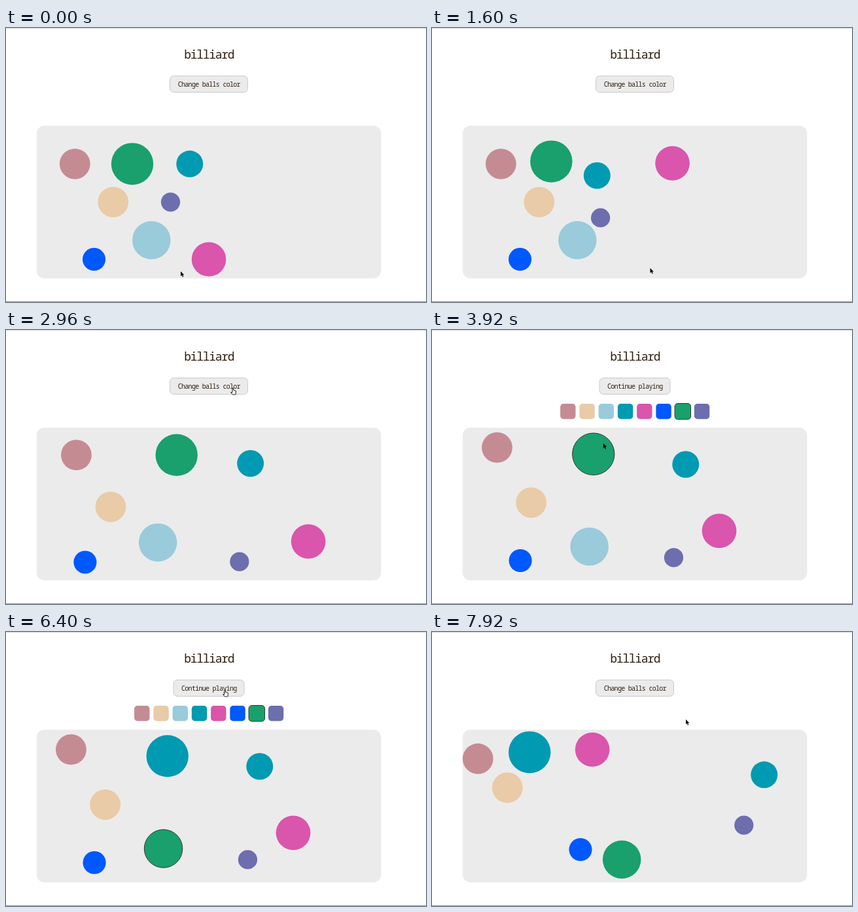
An HTML page with a canvas that plays this animation: 642x420 px, repeating every 8 s.

```html
<!DOCTYPE html>
<html lang="en">
<head>
<meta charset="utf-8">
<title>billiard</title>
<style>
html, body { margin: 0; width: 100%; height: 100%; overflow: hidden; background: #fff; }
canvas { display: block; }
</style>
</head>
<body>
<canvas id="stage" width="642" height="420"></canvas>
<script>
const ctx = document.getElementById('stage').getContext('2d');
const LOOP = 8000, STEP = 80;
const PAUSE = 3120, RESUME = 6560;
const TABLE = { x: 46.8, y: 149.8, w: 900, h: 400, scale: 0.585 };
const BOUNCE = 0.7;   // share of speed kept after a cushion
const TRAVEL = 500;   // pointer move time
const TEAL = '#009ab2', GREEN = '#19a06c', INK = '#2e1f0f', GREY = '#ebebeb', RING = '#333';

// Balls live in table units. Each hit is [time, x, y, cushions touched on the way].
const ball = (color, r, ...hits) => ({ color, r, hits });

const rose = ball('#c58b93', 40, [1690, 100, 100], [2440, 148, 135], [3120, 90, 52],
  [3960, 43, 82, 'top'], [4480, 40, 76]);
const tan = ball('#e9cba7', 40, [2440, 200, 200], [2675, 219, 227], [3960, 104, 138], [4480, 117, 152]);
const sky = ball('#99cbdb', 50, [1615, 300, 300], [1763, 229, 340], [2160, 311, 322],
  [2675, 291, 281], [3680, 382, 350], [4480, 416, 340]);
const teal = ball(TEAL, 35, [1385, 400, 100], [1530, 335, 135], [2160, 481, 94],
  [2617, 507, 88], [4480, 788, 118]);
const pink = ball('#da55ac', 45, [500, 450, 350], [1385, 467, 42, 'right'],
  [2960, 710, 298, 'right bottom'], [4480, 339, 52, 'top']);
const blue = ball('#0058ff', 30, [1763, 150, 350], [4233, 319, 319, 'left bottom'], [4480, 308, 314]);
const green = ball(GREEN, 55, [1555, 250, 100], [1690, 195, 81], [2617, 417, 77, 'top'],
  [3680, 258, 60], [4480, 175, 59, 'top']);
const purple = ball('#6c6eae', 25, [1530, 350, 200], [1618, 363, 252], [2160, 434, 299],
  [2960, 530, 351, 'bottom'], [4480, 735, 250]);
const balls = [rose, tan, sky, teal, pink, blue, green, purple];

const stops = [[700, 333.5, 368], [2850, 347, 89], [3600, 247, 195], [4240, 297, 123],
  [4920, 253, 336], [5760, 384, 123], [6400, 335, 89], [7040, 422, 92], [7880, 388, 134]];

const mix = (a, b, k) => a + (b - a) * k;
const clamp = k => Math.min(1, Math.max(0, k));
const smooth = k => k * k * (3 - 2 * k);

function cushion(name, r) {
  const axis = name === 'left' || name === 'right' ? 0 : 1;
  const far = name === 'right' || name === 'bottom';
  return { axis, far, at: far ? (axis ? TABLE.h : TABLE.w) - r : r };
}

// Straight run towards the mirrored end point, folded back at the cushions.
function roll(from, to, names, r, k) {
  const walls = names ? names.split(' ').map(name => cushion(name, r)) : [];
  const end = [...to];
  for (const { axis, at } of walls) end[axis] = 2 * at - end[axis];
  if (walls.length) {
    const { axis, at } = walls[0];
    const share = (at - from[axis]) / (end[axis] - from[axis]);
    const hit = share / (share + (1 - share) / BOUNCE);
    k = k < hit ? k / hit * share : mix(share, 1, (k - hit) / (1 - hit));
  }
  const p = from.map((v, i) => mix(v, end[i], k));
  for (const { axis, far, at } of walls) {
    p[axis] = (far ? Math.min : Math.max)(p[axis], 2 * at - p[axis]);
  }
  return p;
}

function place({ hits, r }, t) {
  const next = hits.findIndex(hit => hit[0] > t);
  if (next <= 0) return hits.at(next).slice(1, 3);
  const [t0, ...from] = hits[next - 1], [t1, x, y, names] = hits[next];
  return roll(from.slice(0, 2), [x, y], names, r, (t - t0) / (t1 - t0));
}

function pointerAt(t) {
  return stops.reduce(([px, py], [arrive, x, y]) => {
    const k = smooth(clamp((t - arrive) / TRAVEL + 1));
    return [mix(px, x, k), mix(py, y, k)];
  }, [267, 373]);
}

function paint(fill, stroke) {
  ctx.fillStyle = fill;
  ctx.fill();
  if (!stroke) return;
  ctx.strokeStyle = stroke;
  ctx.lineWidth = 1;
  ctx.stroke();
}

function box(x, y, w, h, r, fill, stroke) {
  ctx.beginPath();
  ctx.roundRect(x, y, w, h, r);
  paint(fill, stroke);
}

function label(text, y, size) {
  ctx.font = `${size}px "Noto Sans Mono", monospace`;
  ctx.letterSpacing = `${-0.072 * size}px`;
  ctx.textAlign = 'center';
  ctx.fillStyle = INK;
  ctx.fillText(text, 310.3, y);
}

function colorOf(b, t) {
  if (b === green && t >= 4240) return TEAL;
  if (b === sky && t >= 5800) return GREEN;
  return b.color;
}

function selectedAt(t) {
  if (t < 3680 || t >= RESUME) return null;
  return t < 4960 ? green : sky;
}

function shape(x, y, points, fill, stroke) {
  ctx.beginPath();
  points.forEach(([dx, dy]) => ctx.lineTo(x + dx, y + dy));
  ctx.closePath();
  paint(fill, stroke);
}

const drawArrow = (x, y) => shape(x, y,
  [[0, 0], [0, 7.6], [1.8, 6], [3, 8.8], [4.3, 8.2], [3.1, 5.5], [5.4, 5.4]], '#000');

const drawHand = (x, y) => shape(x, y,
  [[-1, 0], [0.4, 0], [0.8, 3.2], [4, 4], [4.6, 5], [3.8, 10], [-0.6, 10], [-3.4, 6.4], [-0.9, 6.6]],
  '#fff', '#222');

function draw(t) {
  const choosing = t >= PAUSE && t < RESUME;
  const playTime = t < RESUME ? Math.min(t, PAUSE) : t - RESUME + PAUSE;
  const selected = selectedAt(t);

  ctx.fillStyle = '#fff';
  ctx.fillRect(0, 0, 642, 420);
  ctx.fillStyle = '#d8d8d8';
  ctx.fillRect(0, 0, 642, 1);
  ctx.fillStyle = '#8e8e8e';
  ctx.fillRect(0, 419, 642, 1);

  label('billiard', 47, 18);
  const width = choosing ? 108 : 119;
  box(310 - width / 2, 73.5, width, 25, 6, GREY, '#c9c9c9');
  label(choosing ? 'Continue playing' : 'Change balls color', 89.5, 10);

  if (choosing) {
    balls.forEach(({ color }, i) => {
      const on = selected && colorOf(selected, t) === color;
      const size = on ? 24.5 : 23.4;
      box(207.8 + i * 29.25 - size / 2, 124.8 - size / 2, size, size, 4.7, color, on && RING);
    });
  }

  const { x: left, y: top, w, h, scale } = TABLE;
  box(left, top, w * scale, h * scale, 11.7, GREY);
  for (const b of balls) {
    const [x, y] = place(b, playTime);
    ctx.beginPath();
    ctx.arc(left + x * scale, top + y * scale, b.r * scale, 0, 2 * Math.PI);
    paint(colorOf(b, t), b === selected && RING);
  }

  const [x, y] = pointerAt(t);
  const onButton = Math.abs(x - 310) < width / 2 && y > 73 && y < 99;
  const onSwatch = choosing && x > 196 && x < 425 && y > 113 && y < 137;
  (onButton || onSwatch ? drawHand : drawArrow)(x, y);
}

function tick(now) {
  draw(Math.floor((now % LOOP) / STEP) * STEP);
  requestAnimationFrame(tick);
}
requestAnimationFrame(tick);
</script>
</body>
</html>
```
